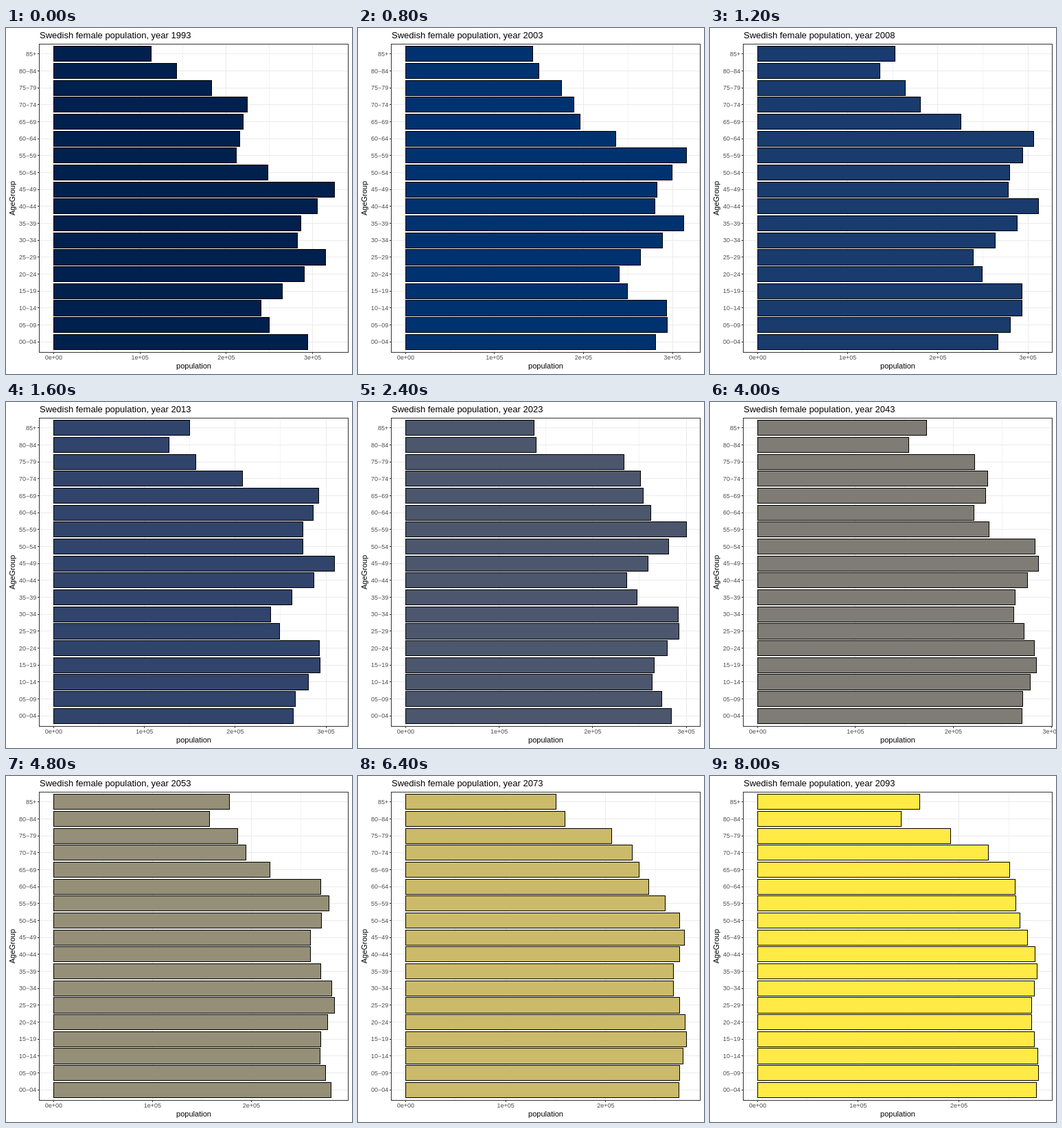
Recreate the animation shown at these times as an HTML page. Size 504 by 504 pixels, loop 8400 ms.

```html
<!DOCTYPE html>
<html lang="en">
<head>
<meta charset="utf-8">
<title>Population by age group</title>
<style>
  html, body { margin: 0; width: 100%; height: 100%; overflow: hidden; background: #fff; }
  svg { display: block; width: 504px; height: 504px; font-family: "Liberation Sans", Arial, sans-serif; }
  line, rect { shape-rendering: crispEdges; }
  .tick { font-size: 9px; fill: #4d4d4d; }
  .name { font-size: 11px; text-anchor: middle; }
</style>
</head>
<body>
<svg id="chart" viewBox="0 0 504 504"></svg>
<script>
const STEP = 400, STEPS = 21, GROUPS = 18, OLDEST = GROUPS - 1;
const X0 = 69.34, X1 = 478.1, Y0 = 457.25, PITCH = 24.67;
const LEFT = 48, RIGHT = 498, TOP = 23, BOTTOM = 472;

// Turning points: age group, thousands of people in 1993
const shape = [[0, 294], [1.5, 228], [5, 315], [6.3, 273], [9, 325],
  [10.5, 209.5], [14, 224], [16.3, 130], [17, 112.7]];
// Colour stops: step, red, green, blue
const ramp = [[0, 0, 32, 77], [2, 0, 50, 111], [4, 49, 68, 107], [8, 102, 105, 112],
  [12, 149, 143, 120], [16, 203, 186, 105], [20, 255, 234, 70]];

// Straight lines through keys whose first entry is the position
function between(keys, x) {
  const i = Math.max(1, keys.findIndex(k => k[0] >= x));
  const a = keys[i - 1], b = keys[i], f = (x - a[0]) / (b[0] - a[0]);
  return a.slice(1).map((v, k) => v + (b[k + 1] - v) * f);
}

// Mortality grows almost exponentially with age
function survival(group) {
  if (group > 15) return .52;
  const d = group - 15;
  return Math.exp(-.257 * Math.exp(.6 * d + .014 * d * d));
}

// Births echo the earlier baby boom in a fading wave
const births = step => 276.7 + 20 * Math.exp(-.11 * step) * Math.cos(1.05 * (step - .75));

function age(pop, born) {
  const kept = pop.map((v, i) => v * survival(i));
  const next = [born, ...kept.slice(0, OLDEST)];
  next[OLDEST] += kept[OLDEST];
  return next;
}

const years = [Array.from({ length: GROUPS }, (_, i) => between(shape, i)[0])];
for (let s = 1; s < STEPS; s++) years.push(age(years[s - 1], births(s)));

const snap = v => Math.floor(v) + .5;
const two = n => String(n).padStart(2, "0");
const line = (x1, y1, x2, y2, stroke) =>
  `<line x1="${x1}" y1="${y1}" x2="${x2}" y2="${y2}" stroke="${stroke}"/>`;
const box = (x1, y1, x2, y2, fill, stroke) =>
  `<rect x="${snap(x1)}" y="${snap(y1)}" width="${snap(x2) - snap(x1)}" ` +
  `height="${snap(y2) - snap(y1)}" fill="${fill}" stroke="${stroke}"/>`;
const label = (x, y, anchor, text) =>
  `<text class="tick" x="${x}" y="${y}" text-anchor="${anchor}">${text}</text>`;

function draw(step) {
  const pop = years[step], top = Math.max(...pop);
  const toX = v => X0 + v / top * (X1 - X0);
  const fill = `rgb(${between(ramp, step).map(Math.round)})`;
  let minor = "", major = "", bars = "", axes = "";

  for (let v = 0; v <= top * 1.05; v += 50) {
    const x = snap(toX(v));
    if (v % 100) {
      minor += line(x, TOP, x, BOTTOM, "#f3f3f3");
    } else {
      major += line(x, TOP, x, BOTTOM, "#ebebeb");
      axes += line(x, BOTTOM, x, BOTTOM + 3, "#333") +
        label(toX(v), 483, "middle", v ? `${v / 100}e+05` : "0e+00");
    }
  }
  pop.forEach((v, i) => {
    const y = Y0 - i * PITCH, mid = snap(y), half = PITCH * .45;
    const text = i < OLDEST ? `${two(i * 5)}\u2212${two(i * 5 + 4)}` : "85+";
    major += line(LEFT, mid, RIGHT, mid, "#ebebeb");
    bars += box(X0, y - half, toX(v), y + half, fill, "#000");
    axes += line(LEFT - 2, mid, LEFT, mid, "#333") + label(44.3, y + 3.2, "end", text);
  });

  document.getElementById("chart").innerHTML =
    minor + major + bars + box(LEFT, TOP, RIGHT, BOTTOM, "none", "#333") + axes +
    `<text x="49" y="15" font-size="13">Swedish female population, year ${1993 + step * 5}</text>` +
    `<text class="name" x="273.5" y="496">population</text>` +
    `<text class="name" transform="translate(12.5 248) rotate(-90)">AgeGroup</text>`;
}

let shown = -1;
const begin = performance.now();
function tick() {
  const step = Math.floor((performance.now() - begin) / STEP) % STEPS;
  if (step !== shown) draw(shown = step);
  requestAnimationFrame(tick);
}
tick();
</script>
</body>
</html>
```
